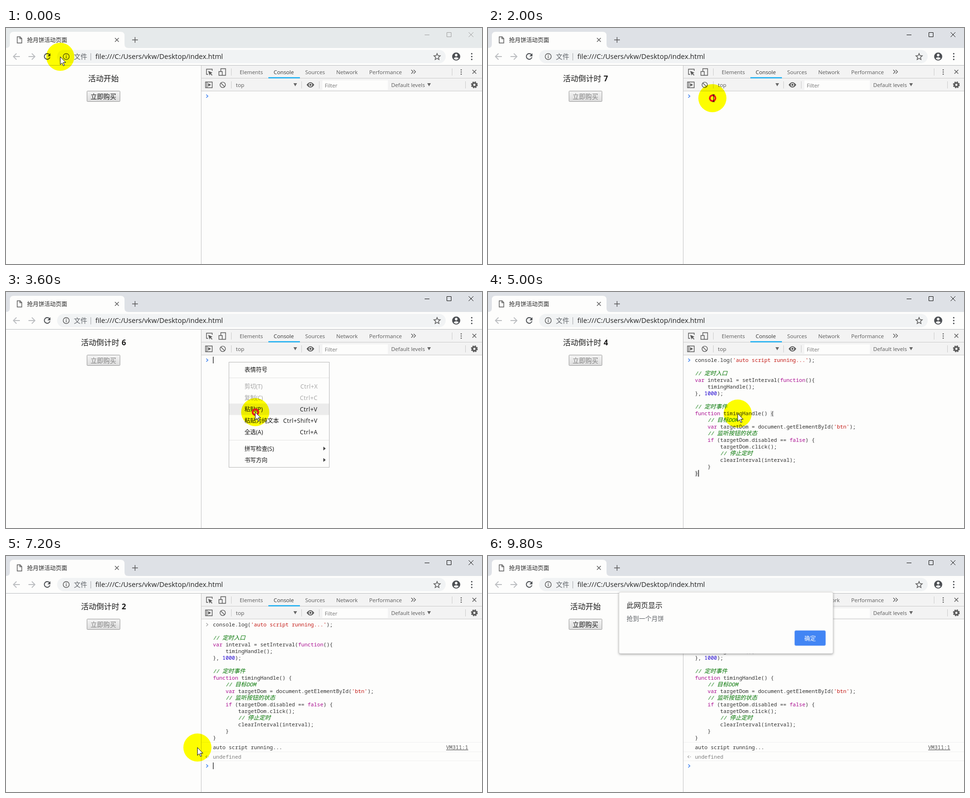
Write an HTML page that moves like this. It is 996 px wide and 496 px high and loops after 9.9 s.

```html
<!DOCTYPE html>
<html lang="zh">
<head>
<meta charset="utf-8">
<title>抢月饼活动页面</title>
<style>
html, body { margin: 0; width: 100%; height: 100%; overflow: hidden; background: #fdfdfc; }
svg { display: block; width: 996px; height: 496px; }
text { font: 12px "Open Sans", "Noto Sans CJK SC", "Noto Sans CJK", sans-serif; fill: #222; white-space: pre; }
.tool text { font-size: 11.3px; fill: #5a5a5a; }
.page text { font-size: 16px; fill: #1a1a1a; }
.page .bold { font-weight: bold; }
.menu text { letter-spacing: .5px; fill: #111; }
.menu .zh { letter-spacing: 0; }
.menu .off { fill: #a3a3a3; }
.mono text { font: 11px "Noto Sans Mono", "Noto Sans CJK SC", monospace; fill: #303030; }
.kw { fill: #aa0d91; }
.str { fill: #c41a16; }
.num { fill: #1c00cf; }
.com { fill: #007400; font-style: italic; }
.cj { font-size: 12px; font-family: "Noto Sans CJK SC", "Noto Sans CJK", sans-serif; }
.ln { fill: none; stroke: #5a5a5a; stroke-width: 1.4; }
.sep { fill: none; stroke: #ccc; }
</style>
</head>
<body>
<svg viewBox="0 0 996 496">
  <defs>
    <linearGradient id="face" x2="0" y2="1">
      <stop offset="0" stop-color="#f4f4f4"/><stop offset="1" stop-color="#dcdcdc"/>
    </linearGradient>
    <filter id="shade" x="-5%" y="-10%" width="110%" height="125%">
      <feDropShadow dx="0" dy="1.5" stdDeviation="2" flood-color="#444" flood-opacity=".5"/>
    </filter>
  </defs>
  <rect width="996" height="496" fill="#fdfdfc"/>

  <!-- browser frame -->
  <rect id="strip" width="996" height="42"/>
  <path d="M0 42Q8 42 8 34V16Q8 8 16 8H240Q248 8 248 16V34Q248 42 256 42Z" fill="#fdfdfc"/>
  <path class="ln" d="M23.5 18.5H29.5L33 22V31.5H23.5ZM29 18.5V22.5H33"/>
  <text x="44" y="29.5">抢月饼活动页面</text>
  <path class="ln" d="M228 21L236 29M236 21L228 29M264 25H276M270 19V31"/>
  <path id="win" fill="none" d="M876 14.5H886M922.5 9.5H931.5V18.5H922.5ZM968 9L978 19M978 9L968 19"/>

  <rect x="107" y="46" width="813" height="28" rx="14" fill="#f1f3f4"/>
  <path d="M29 60H16M22 53.5L15.5 60L22 66.5M47 60H60M54 53.5L60.5 60L54 66.5" fill="none" stroke="#bcbec1" stroke-width="1.8"/>
  <path d="M91 56A6 6 0 1 0 92 61.5" fill="none" stroke="#4c4f53" stroke-width="1.9"/>
  <path d="M93 53V59.5H86.5Z" fill="#4c4f53"/>
  <circle class="ln" cx="126" cy="60" r="6.3"/>
  <path class="ln" d="M126 56.3V58M126 59V63.6"/>
  <text x="142" y="65" style="font-size:14px;fill:#5f6368">文件</text>
  <path d="M177.5 53V68" stroke="#a4a7aa"/>
  <text x="187" y="65" style="font-size:14.5px">file:///C:/Users/vkw/Desktop/index.html</text>
  <path class="ln" d="M902 53.5L903.9 58L908.7 58.4L905 61.6L906.1 66.3L902 63.8L897.9 66.3L899 61.6L895.3 58.4L900.1 58Z"/>
  <circle cx="942" cy="60" r="8.5" fill="#4c4f53"/>
  <circle cx="942" cy="57" r="2.7" fill="#fdfdfc"/>
  <path d="M936.7 63.6Q942 59.6 947.3 63.6Q945 66.8 942 66.8Q939 66.8 936.7 63.6Z" fill="#fdfdfc"/>
  <path d="M974.5 54v.01M974.5 60v.01M974.5 66v.01" stroke="#4c4f53" stroke-width="3.2" stroke-linecap="round"/>
  <path d="M0 78.5H996" stroke="#bcbec0"/>

  <!-- page -->
  <g class="page">
    <text id="head" y="112"></text><text id="digit" class="bold" x="242" y="112"></text>
    <rect x="169.5" y="132.5" width="69" height="22" rx="1" fill="url(#face)" stroke="#999"/>
    <text id="buy" x="177" y="149" style="font-size:13.4px">立即购买</text>
  </g>

  <!-- console panel -->
  <g class="tool">
    <rect x="409" y="79" width="587" height="53" fill="#f3f3f3"/>
    <path class="sep" d="M409 105.5H996M409 132.5H996M471.5 85V100M933.5 85V100M471.5 112V127M618.5 112V127M655.5 112V127M961.5 112V127"/>
    <path d="M408.5 79V496" stroke="#c4c4c4"/>
    <rect x="549" y="103.5" width="66" height="2.2" fill="#03a9f4"/>
    <path class="ln" d="M423 97.5H419.5V86.5H431.5V90"/>
    <path d="M423 90L432 94L428.6 95.4L432 98.8L430.7 100L427.3 96.6L426 100Z" fill="#5a5a5a"/>
    <path class="ln" d="M449.5 92V85.5H459.5V99.5H453M445.5 91.5H452.5V99.5H445.5Z"/>
    <text x="489" y="97">Elements</text><text x="560" y="97" style="fill:#333">Console</text>
    <text x="626" y="97">Sources</text><text x="691" y="97">Network</text><text x="760" y="97">Performance</text>
    <path class="ln" d="M848 88L852 92L848 96M853 88L857 92L853 96"/>
    <path d="M952.5 88v.01M952.5 92.5v.01M952.5 97v.01" stroke="#5a5a5a" stroke-width="2.6" stroke-linecap="round"/>
    <path class="ln" d="M976 88L984 96M984 88L976 96"/>
    <path class="ln" d="M417.5 113.5H431.5V125.5H417.5ZM420.5 113.5V125.5"/>
    <path d="M423 116L429 119.5L423 123Z" fill="#5a5a5a"/>
    <path class="ln" d="M449.5 115.5L457.5 123.5"/>
    <circle class="ln" cx="453.5" cy="119.5" r="5.6"/>
    <text x="481" y="124">top</text>
    <path d="M601.5 116H609L605.2 122.5ZM881.5 116H889L885.2 122.5Z" fill="#666"/>
    <path d="M629 119.5Q637 108.5 645 119.5Q637 130.5 629 119.5Z" fill="#5a5a5a"/>
    <circle cx="637" cy="119.5" r="2.9" fill="#5a5a5a" stroke="#f3f3f3" stroke-width="1.5"/>
    <rect x="662" y="110" width="137" height="20" fill="#fdfdfc"/>
    <text x="667" y="125" style="fill:#777">Filter</text>
    <text x="806" y="124">Default levels</text>
    <circle cx="980" cy="119.5" r="6" fill="none" stroke="#5a5a5a" stroke-width="2.4" stroke-dasharray="2.7 2.012"/>
    <circle cx="980" cy="119.5" r="4" fill="none" stroke="#5a5a5a" stroke-width="3.2"/>
  </g>
  <path d="M419 140L422.5 143.2L419 146.4" class="ln prompt" id="in"/>
  <g class="mono">
    <g id="code">
      <path id="match" d="M591 249.5H598V262H591ZM433 375.5H440V388H433Z" fill="#e2e2e2"/>
    </g>
    <g id="out">
      <path d="M409 391.5H996M409 411.5H996M409 430.5H996" stroke="#f0f0f0"/>
      <text x="433" y="406">auto script running...</text>
      <text x="921" y="406" text-decoration="underline" style="fill:#545454">VM311:1</text>
      <path class="ln" d="M421 419.5L418 422L421 424.5M423 422h1.5" style="stroke:#aaa"/>
      <text x="433" y="426" style="fill:#808080">undefined</text>
      <path d="M419 438L422.5 441.2L419 444.4" class="ln prompt"/>
    </g>
  </g>
  <rect id="caret" width="1.2" height="14" fill="#111"/>

  <!-- context menu -->
  <g id="menu" class="menu">
    <rect x="466.5" y="147.5" width="210" height="221" fill="#fdfdfc" stroke="#b8b8b8"/>
    <rect id="hover" x="467" width="209" height="24" fill="#ebebeb"/>
    <path d="M467 180.5H676M467 311.5H676" stroke="#e4e4e4"/>
    <path d="M664 325L669 329L664 333ZM664 349L669 353L664 357Z" fill="#444"/>
  </g>

  <!-- alert -->
  <g id="alert">
    <rect x="274" y="76" width="448" height="129" rx="3" fill="#fdfdfc" stroke="#c8c8c8" stroke-width=".7" filter="url(#shade)"/>
    <text x="290" y="109" style="font-size:15px">此网页显示</text>
    <text x="290" y="136" style="font-size:13px;fill:#5f6368">抢到一个月饼</text>
    <rect x="641.5" y="156.5" width="65" height="32" rx="3" fill="#4285f4" stroke="#a9c6f8"/>
    <text x="662" y="177.5" style="fill:#fdfdfc">确定</text>
  </g>

  <!-- pointer -->
  <g id="halo" style="mix-blend-mode:multiply"><circle r="29.4" fill="#ff0"/></g>
  <g id="mouse">
    <circle id="ring" r="6" cx=".5" fill="none" stroke="#e8101c" stroke-width="3.4"/>
    <path id="arrow" d="M0 0V16.5L3.8 13L6.5 19L9 18L6.3 12H11.5Z" fill="#fdfdfc" stroke="#111" stroke-linejoin="round"/>
    <path id="beam" d="M0 -7.5H5M2.5 -7V7M0 7.5H5" fill="none" stroke="#111" stroke-width="1.2"/>
  </g>
</svg>
<script>
const $ = id => document.getElementById(id);
const LOOP = 9900, STEP = 100;

const script = `console.log('auto script running...');

// 定时入口
var interval = setInterval(function(){
    timingHandle();
}, 1000);

// 定时事件
function timingHandle() {
    // 目标DOM
    var targetDom = document.getElementById('btn');
    // 监听按钮的状态
    if (targetDom.disabled == false) {
        targetDom.click();
        // 停止定时
        clearInterval(interval);
    }
}`;

const span = (cls, s) => `<tspan class="${cls}">${s}</tspan>`;
const paint = line => line.replace(
  /(\/\/.*)|('.*?')|\b(var|function|if|false)\b|\b(\d+)\b/g,
  (s, com, str, kw) => com ? span('com', s.replace(/[\u4e00-\u9fff]+/g, z => span('cj', z)))
    : span(str ? 'str' : kw ? 'kw' : 'num', s));
$('code').insertAdjacentHTML('beforeend', script.split('\n')
  .map((line, i) => `<text x="433" y="${147 + i * 14}">${paint(line)}</text>`).join(''));

// label, shortcut, shortcut x, middle y, disabled
const items = [
  ['表情符号', '', 0, 164], ['剪切(T)', 'Ctrl+X', 616, 199, 1], ['复制(C)', 'Ctrl+C', 615, 223, 1],
  ['粘贴(P)', 'Ctrl+V', 615, 247], ['粘贴为纯文本', 'Ctrl+Shift+V', 580, 271], ['全选(A)', 'Ctrl+A', 615, 295],
  ['拼写检查(S)', '', 0, 330], ['书写方向', '', 0, 354]];
$('menu').insertAdjacentHTML('beforeend', items.map(([a, b, x, y, off]) => {
  const c = off ? 'off' : '';
  return `<text class="zh ${c}" x="499" y="${y + 4}">${a}</text><text class="${c}" x="${x}" y="${y + 4}">${b}</text>`;
}).join(''));

// time, x, y
const path = [
  [0, 113, 60], [400, 87, 60], [1000, 93, 61], [1200, 150, 80], [1500, 390, 160], [1700, 546, 178],
  [1900, 472, 149], [2000, 469, 147], [2300, 472, 152], [3000, 515, 245], [3300, 521, 252], [4000, 521, 252],
  [4300, 530, 238], [4600, 522, 255], [5200, 522, 255], [5700, 238, 130], [5800, 222, 112],
  [6000, 234, 122], [6500, 385, 380], [6700, 400, 402]];

function place(t) {
  const i = path.findIndex(p => p[0] > t);
  if (i < 0) return path[path.length - 1].slice(1);
  const [a, x, y] = path[i - 1], [b, u, v] = path[i], k = (t - a) / (b - a);
  return [x + (u - x) * k, y + (v - y) * k];
}

const within = (t, a, b) => t >= a && t < b;
const show = (id, on) => $(id).style.display = on ? '' : 'none';
const blink = (t, from) => (t - from) % 1000 < 500;
const BLUE = '#367cf1', GRAY = '#aaa';
document.querySelectorAll('.prompt').forEach(p => p.style.stroke = BLUE);

function draw(t) {
  const active = t >= 500, counting = within(t, 800, 8800);
  const pasted = t >= 3800, ran = t >= 5200;
  $('strip').setAttribute('fill', active ? '#dee1e6' : '#e6eaeb');
  $('win').setAttribute('stroke', active ? '#111' : '#a0a0a0');

  $('head').setAttribute('x', counting ? 157 : 172);
  $('head').textContent = counting ? '活动倒计时' : '活动开始';
  $('digit').textContent = counting ? 8 - Math.floor((t - 800) / 1000) : '';
  $('buy').style.fill = counting ? '#808080' : '#1a1a1a';

  show('code', pasted);
  show('match', !ran);
  show('out', ran);
  const shift = `translate(0 ${ran ? 1 : 0})`;
  $('code').setAttribute('transform', shift);
  $('in').setAttribute('transform', shift);
  $('in').style.stroke = ran ? GRAY : BLUE;

  const [cx, cy, from] = ran ? [433, 434, 5200] : pasted ? [440, 374, 3800] : [433, 136, 2200];
  show('caret', within(t, 2200, 8800) && blink(t, from));
  $('caret').setAttribute('x', cx);
  $('caret').setAttribute('y', cy);

  const [x, y] = place(t);
  const hit = items.find(it => !it[4] && Math.abs(it[3] - y) <= 12);
  show('menu', within(t, 2200, 3800));
  show('hover', hit);
  if (hit) $('hover').setAttribute('y', hit[3] - 12.5);

  const k = Math.min(1, Math.max(0, (t - 9100) / 300));
  show('alert', k > 0);
  $('alert').style.opacity = k;

  const move = `translate(${x + .5} ${y + .5})`, seen = t < 9800, beam = within(t, 1500, 2200);
  for (const id of ['halo', 'mouse']) {
    $(id).setAttribute('transform', move);
    show(id, seen);
  }
  show('ring', within(t, 500, 700) || within(t, 1900, 2200) || within(t, 3500, 3800));
  show('beam', beam);
  show('arrow', !beam);
}

const start = performance.now();
function tick() {
  const t = (performance.now() - start) % LOOP;
  draw(Math.floor(t / STEP) * STEP);
  requestAnimationFrame(tick);
}
tick();
</script>
</body>
</html>
```
